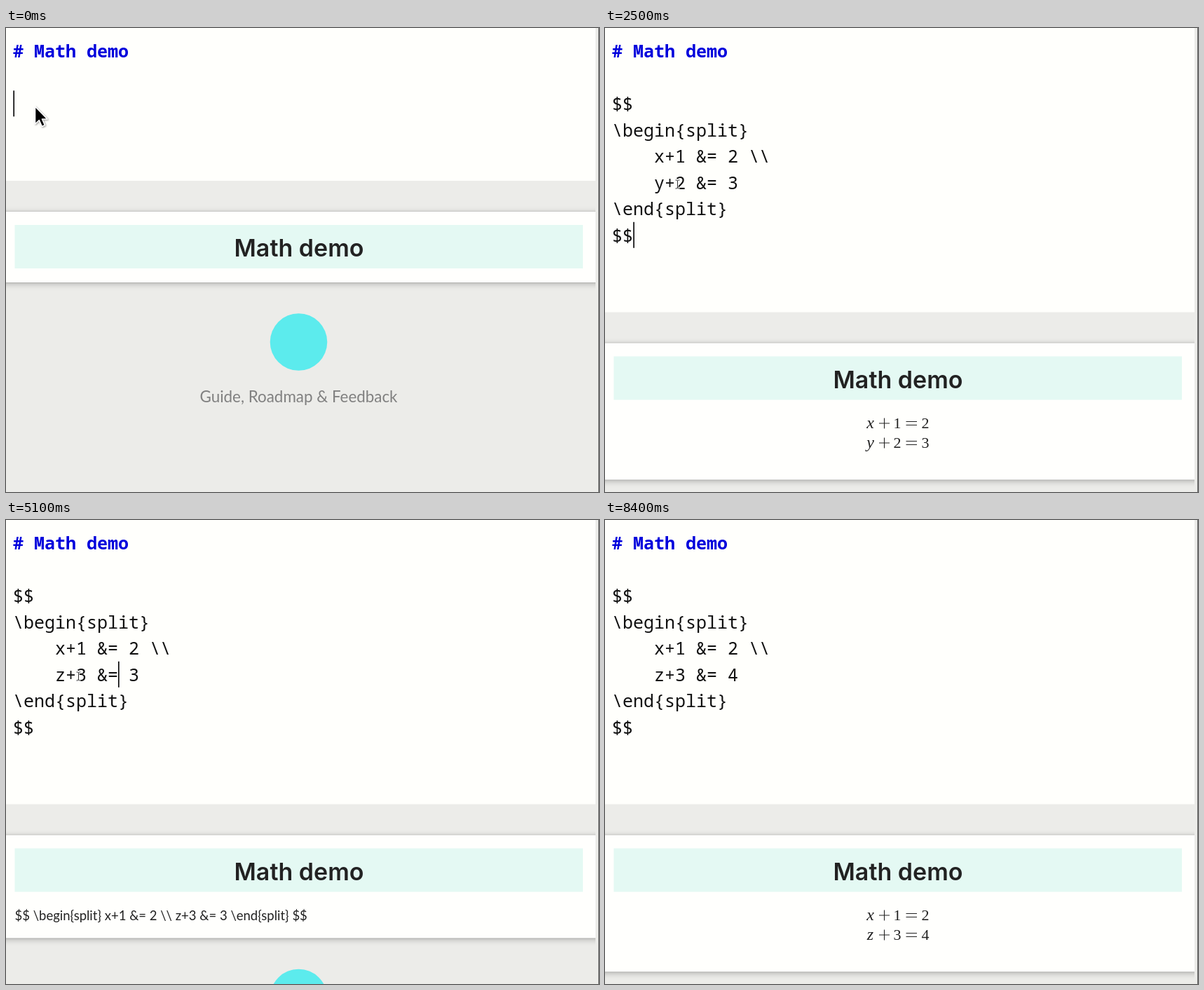
Write an HTML page that moves like this. It is 846 by 662 pixels and loops after 8800 ms.

```html
<!DOCTYPE html>
<html lang="en">
<head>
<meta charset="utf-8">
<title>Math demo</title>
<style>
  html, body { margin: 0; width: 100%; height: 100%; overflow: hidden; background: #ecece9; }
  svg { display: block; }
  text { white-space: pre; }
  .code { font: 25px "Noto Sans Mono", monospace; fill: #111; }
  .code .title { font-weight: 700; fill: #0000dc; }
  .card {
    fill: #fffffd;
    filter: drop-shadow(0 0 1px rgba(0, 0, 0, .25)) drop-shadow(0 2px 4px rgba(0, 0, 0, .25));
  }
  .heading { font: 600 34px Inter, sans-serif; fill: #222; text-anchor: middle; }
  .raw { font: 18.5px Lato, sans-serif; fill: #222; }
  .links { font: 22.4px Lato, sans-serif; fill: #808080; text-anchor: middle; }
  .math { font: 22px "Liberation Serif", serif; fill: #222; text-anchor: middle; }
  .math .var { font-size: 24px; font-style: italic; }
  .math path { stroke: #222; stroke-width: 1.1; fill: none; }
</style>
</head>
<body>
<svg width="846" height="662" viewBox="0 0 846 662">
  <rect width="846" height="662" fill="#ecece9"/>
  <rect id="editor" width="841" fill="#fffffc"/>

  <g id="code" class="code">
    <text class="title" x="10" y="42"># Math demo</text>
  </g>
  <rect id="caret" width="1.6" height="37"/>

  <g id="page">
    <rect id="card" class="card" x="-20" width="890"/>
    <rect x="12.5" y="19" width="810.5" height="62" fill="#e4f9f3"/>
    <text class="heading" x="418" y="64">Math demo</text>
    <text id="raw" class="raw" x="12.5" y="121"></text>
    <g id="math" class="math"></g>
    <g id="footer">
      <circle cx="417.5" cy="85" r="40.8" fill="#5cebed"/>
      <text class="links" x="417.5" y="171">Guide, Roadmap &amp; Feedback</text>
    </g>
  </g>

  <rect x="841" width="5" height="662" fill="#ecece9"/>
  <rect x="845" width="1" height="662" fill="#666"/>

  <path id="arrow" transform="translate(41.5 112)" d="M0 0V25L5.8 19.6L9.8 28.5L14 26.6L10 18H17.5Z"
        stroke="#fff" stroke-width="1.6" stroke-linejoin="round"
        style="filter:drop-shadow(1px 1px 1px rgba(0,0,0,.4))"/>
  <g id="beam" fill="none">
    <path d="M-3 -6H-1L0 -5L1 -6H3M0 -5V5M-3 6H-1L0 5L1 6H3" stroke="#fff" stroke-width="2.4"/>
    <path d="M-3 -6H-1L0 -5L1 -6H3M0 -5V5M-3 6H-1L0 5L1 6H3" stroke="#333" stroke-width="1"/>
  </g>
</svg>
<script>
const LOOP = 8800, PASTE = 1100, CLICK = 2600, LEAVE = 8100;
const ROW = 37.5, COL = 14.96, INDENT = 4;
const KEY_GAP = 150, BLINK = 500;

// Bursts of keys at a steady pace: < and > move the caret, - deletes.
const bursts = [[3200, '<'], [3600, '-z>>'], [4450, '-3'], [4800, '>>>>>'], [5700, '-'], [6000, '4']];
const pauses = [100, 1700, 6400];          // the idle caret starts to blink
const refreshes = [1700, 4300, 5100, 6400]; // the preview reloads the raw text
const cardHeight = { none: 101, raw: 147, math: 195 };

const $ = id => document.getElementById(id);
const set = (id, attrs) => {
  for (const name in attrs) $(id).setAttribute(name, attrs[name]);
};
const show = (id, on) => set(id, { visibility: on ? 'visible' : 'hidden' });

// Replays the keys pressed so far on the edited line.
function typed(t) {
  let line = 'y+2 &= 3', pos = 2, last = CLICK;
  for (const [start, keys] of bursts) {
    [...keys].forEach((key, i) => {
      const time = start + i * KEY_GAP;
      if (time > t) return;
      last = time;
      if (key === '<') pos--;
      else if (key === '>') pos++;
      else if (key === '-') line = line.slice(0, --pos) + line.slice(pos + 1);
      else line = line.slice(0, pos) + key + line.slice(pos++);
    });
  }
  return { line, pos, last };
}

function caretAt(t) {
  if (t < PASTE) return { col: 0, row: 2, last: 0 };
  if (t < CLICK) return { col: 2, row: 7, last: PASTE };
  const { pos, last } = typed(t);
  return { col: INDENT + pos, row: 5, last };
}

function caretOn(t, last) {
  const pause = pauses.findLast(p => p <= t);
  return !(pause > last) || (t - pause) % (2 * BLINK) >= BLINK;
}

// Each reload shows raw text first; typesetting gets faster every time.
function previewAt(t) {
  const i = refreshes.findLastIndex(r => r <= t);
  if (i < 0) return { mode: 'none' };
  const wait = 800 - 100 * i;
  return {
    mode: t < refreshes[i] + wait ? 'raw' : 'math',
    line: typed(refreshes[i]).line
  };
}

function glide(t, from, to) {
  const k = Math.min(1, Math.max(0, (t - from) / (to - from)));
  return k * (2 - k);
}

const equation = (line, y) => `
  <g transform="translate(0 ${y})">
    <text class="var" x="378.5">${line[0]}</text>
    <path d="M391 -6.5H406M398.5 -14V1M429.5 -9H445M429.5 -4H445"/>
    <text x="417">${line[2]}</text>
    <text x="457">${line.at(-1)}</text>
  </g>`;

function renderEditor(t) {
  const pasted = t >= PASTE;
  const rows = ['$$', '\\begin{split}', '    x+1 &= 2 \\\\', '    ' + typed(t).line, '\\end{split}', '$$'];
  lines.forEach((el, i) => { el.textContent = pasted ? rows[i] : ''; });

  const { col, row, last } = caretAt(t);
  set('caret', { x: 10.4 + COL * col, y: 14.3 + ROW * row });
  show('caret', caretOn(t, last));

  const grown = pasted ? 5 * ROW : 0;
  set('editor', { height: 218 + grown });
  set('page', { transform: `translate(0 ${262 + grown})` });
}

function renderPreview(t) {
  const { mode, line } = previewAt(t);
  const height = cardHeight[mode];
  set('card', { height });
  set('footer', { transform: `translate(0 ${height})` });
  $('raw').textContent = mode === 'raw'
    ? `$$ \\begin{split} x+1 &= 2 \\\\ ${line} \\end{split} $$` : '';
  $('math').innerHTML = mode === 'math'
    ? equation('x+1 &= 2', 121) + equation(line, 149) : '';
}

function renderPointer(t) {
  const down = glide(t, 1600, 2300), up = glide(t, 7400, 8000);
  const x = 41.5 + 62 * (down - up), y = 113 + 110 * down - 168 * up;
  set('beam', { transform: `translate(${x} ${y})` });
  show('arrow', t < 100);
  show('beam', t >= 100 && t < LEAVE);
}

const lines = Array.from({ length: 6 }, (_, i) => {
  const el = document.createElementNS('http://www.w3.org/2000/svg', 'text');
  el.setAttribute('x', 10);
  el.setAttribute('y', 117 + ROW * i);
  return $('code').appendChild(el);
});

const start = performance.now();
let shown = -1;
function tick() {
  const t = Math.floor((performance.now() - start) % LOOP / 100) * 100;
  if (t !== shown) {
    shown = t;
    renderEditor(t);
    renderPreview(t);
    renderPointer(t);
  }
  requestAnimationFrame(tick);
}
tick();
</script>
</body>
</html>
```
